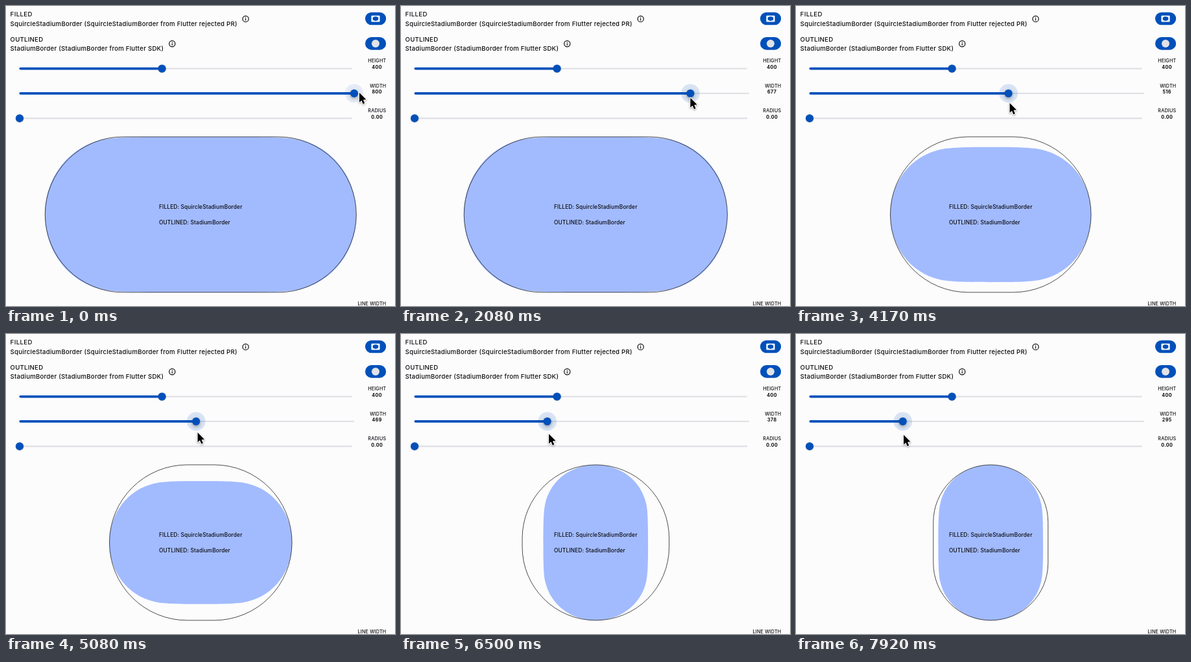
Animation of 600x463 px, one loop 8000 ms. Source, as an HTML page with a canvas:

```html
<!DOCTYPE html>
<html lang="en">
<head>
<meta charset="utf-8">
<title>Stadium border comparison</title>
<style>
html, body { margin: 0; width: 100%; height: 100%; overflow: hidden; background: #fcfcfd; }
canvas { display: block; width: 600px; height: 463px; }
</style>
</head>
<body>
<canvas id="stage"></canvas>
<script>
const W = 600, H = 463, LOOP = 8000, HOLD = 746, STEP = 250 / 3;
const BLUE = '#0050ba', INK = '#0c0c0f', PAPER = '#fcfcfd';
const SCALE = 0.6, CX = 300.3, CY = 321.9;
const canvas = document.getElementById('stage');
const ctx = canvas.getContext('2d');
const dpr = window.devicePixelRatio || 1;
canvas.width = W * dpr;
canvas.height = H * dpr;

// [step, value] pairs
const widthKeys = [[-1, 800], [16, 677], [27, 575], [39, 524.5], [41, 516], [49, 484],
  [59, 430], [62, 411], [77, 341], [79, 330], [86, 295]];
const pointerDx = [[-1, 8], [5, 1], [16, 0], [27, 1], [41, 2], [62, 2.6], [77, 2], [86, 1.3]];
const pointerY = [[-1, 133], [16, 141], [27, 146], [41, 149], [62, 153], [77, 154], [86, 155]];

// Monotone cubic interpolation through the keys
function sample(keys, x) {
  const slope = i => (keys[i + 1][1] - keys[i][1]) / (keys[i + 1][0] - keys[i][0]);
  const tangent = i => {
    if (i === 0) return slope(0);
    if (i === keys.length - 1) return slope(i - 1);
    const a = slope(i - 1), b = slope(i);
    return a * b > 0 ? 2 * a * b / (a + b) : 0;
  };
  let i = 0;
  while (i < keys.length - 2 && x > keys[i + 1][0]) i++;
  const [x0, y0] = keys[i], [x1, y1] = keys[i + 1];
  const h = x1 - x0, t = (x - x0) / h, u = 1 - t;
  return y0 * u * u * (1 + 2 * t) + y1 * t * t * (3 - 2 * t) +
    h * t * u * (u * tangent(i) - t * tangent(i + 1));
}

function text(str, x, y, size, spacing, { weight = 500, align = 'left' } = {}) {
  ctx.font = `${weight} ${size}px Inter, Roboto, sans-serif`;
  ctx.letterSpacing = spacing + 'px';
  ctx.textAlign = align;
  ctx.fillStyle = INK;
  ctx.fillText(str, x, y);
}

function disc(x, y, r, color) {
  ctx.beginPath();
  ctx.arc(x, y, r, 0, 2 * Math.PI);
  ctx.fillStyle = color;
  ctx.fill();
}

function pill(x, y, w, h, r, color) {
  ctx.beginPath();
  ctx.roundRect(x, y, w, h, r);
  ctx.fillStyle = color;
  ctx.fill();
}

function infoIcon(x, y) {
  ctx.beginPath();
  ctx.arc(x, y, 4.6, 0, 2 * Math.PI);
  ctx.lineWidth = 1.2;
  ctx.strokeStyle = INK;
  ctx.stroke();
  ctx.fillStyle = INK;
  ctx.fillRect(x - 0.6, y - 2.6, 1.2, 1.2);
  ctx.fillRect(x - 0.6, y - 0.6, 1.2, 3.2);
}

function slider(y, x, end, label, value, halo = 0) {
  pill(19.8, y - 1.2, end - 19.8, 2.4, 1.2, '#e2e2e6');
  pill(20.5, y - 1.8, x - 20.5, 3.6, 1.8, BLUE);
  if (halo) disc(x, y, 14.4, `rgba(0,80,186,${halo})`);
  ctx.save();
  ctx.shadowColor = 'rgba(0,0,0,0.35)';
  ctx.shadowBlur = (halo ? 5 : 1.2) * dpr;
  ctx.shadowOffsetY = (halo ? 2 : 0.3) * dpr;
  disc(x, y, 6.1, BLUE);
  ctx.restore();
  text(label, 586.3, y - 9.2, 7.2, 0.18, { align: 'right' });
  text(value, 572.2, y + 0.5, 7.2, 0.38, { weight: 700, align: 'center' });
}

// Squircle ends along the longer axis, with the shorter one clamped
function squircle(w, h) {
  const EDGE = 2.00594, SIDE = 1.3506, RATIO = EDGE / SIDE;
  const upright = w < h;
  const long = Math.max(w, h), short = Math.min(w, h, long / RATIO);
  const r = short / 2 / SIDE, a = long / 2, b = short / 2;
  const at = (sx, sy) => (u, v) => [sx * (a - u * r), sy * (b - v * r)];
  ctx.save();
  ctx.translate(CX, CY);
  if (upright) ctx.rotate(Math.PI / 2);
  ctx.beginPath();
  for (const sx of [1, -1]) {
    const first = at(sx, -sx), second = at(sx, sx);
    ctx.lineTo(...first(EDGE, 0));
    ctx.bezierCurveTo(...first(1.635, 0), ...first(1.2, 0), ...first(0.9954, 0.05));
    ctx.bezierCurveTo(...first(0.38, 0.19), ...first(0, 0.73), ...first(0, SIDE));
    ctx.bezierCurveTo(...second(0, 0.73), ...second(0.38, 0.19), ...second(0.9954, 0.05));
    ctx.bezierCurveTo(...second(1.2, 0), ...second(1.635, 0), ...second(EDGE, 0));
  }
  ctx.closePath();
  ctx.fillStyle = '#a2bbff';
  ctx.fill();
  ctx.restore();
}

function stadium(w, h) {
  ctx.beginPath();
  ctx.roundRect(CX - w / 2, CY - h / 2, w, h, Math.min(w, h) / 2);
  ctx.lineWidth = 0.7;
  ctx.strokeStyle = '#000';
  ctx.stroke();
}

function pointer(x, y) {
  const shape = [[0, 0], [0, 16.4], [3.7, 13], [6.2, 19], [9, 17.8], [6.5, 12], [11.4, 11.6]];
  ctx.save();
  ctx.translate(x, y);
  ctx.scale(0.92, 0.92);
  ctx.beginPath();
  shape.forEach(p => ctx.lineTo(...p));
  ctx.closePath();
  ctx.lineJoin = 'round';
  ctx.lineWidth = 2.4;
  ctx.strokeStyle = '#fff';
  ctx.shadowColor = 'rgba(0,0,0,0.35)';
  ctx.shadowBlur = 2.5 * dpr;
  ctx.shadowOffsetY = dpr;
  ctx.stroke();
  ctx.shadowColor = 'transparent';
  ctx.fillStyle = '#000';
  ctx.fill();
  ctx.restore();
}

function header() {
  text('FILLED', 6.6, 16.4, 9.6, 0.4);
  text('SquircleStadiumBorder (SquircleStadiumBorder from Flutter rejected PR)', 6.6, 30.6, 9.6, 0.25);
  infoIcon(369.6, 19.9);
  text('OUTLINED', 6.6, 54.6, 9.6, 0.25);
  text('StadiumBorder (StadiumBorder from Flutter SDK)', 6.6, 68.9, 9.6, 0.25);
  infoIcon(256.3, 58.2);

  pill(554, 9.7, 32.2, 19.6, 9.8, BLUE);
  pill(563.4, 14.7, 13.2, 9.8, 1.2, '#fff');
  ctx.beginPath();
  ctx.ellipse(570, 19.6, 4.4, 3.3, 0, 0, 2 * Math.PI);
  ctx.fillStyle = BLUE;
  ctx.fill();
  pill(554, 48.1, 32.2, 19.6, 9.8, BLUE);
  disc(570, 58, 6, '#e2e2e6');
}

function draw(time) {
  const step = Math.min(86, Math.max(-1, Math.floor((time - HOLD) / STEP)));
  const width = sample(widthKeys, step);
  const thumb = 21 + (width - 100) / 700 * 516;

  ctx.setTransform(dpr, 0, 0, dpr, 0, 0);
  ctx.fillStyle = PAPER;
  ctx.fillRect(0, 0, W, H);
  header();
  slider(96.6, 240.6, 534, 'HEIGHT', '400');
  slider(134.9, thumb, 537.2, 'WIDTH', String(Math.round(width)), step < 0 ? 0.09 : 0.14);
  slider(173.3, 21, 534, 'RADIUS', '0.00');
  squircle(width * SCALE, 400 * SCALE);
  stadium(width * SCALE, 400 * SCALE);
  text('FILLED: SquircleStadiumBorder', 236, 313.2, 8.4, 0.12);
  text('OUTLINED: StadiumBorder', 236, 337.3, 8.4, 0.12);
  text('LINE WIDTH', 586.3, 462, 7.2, 0.18, { align: 'right' });
  pointer(thumb + sample(pointerDx, step), sample(pointerY, step) + 0.7);
}

const start = performance.now();
function tick() {
  draw((performance.now() - start) % LOOP);
  requestAnimationFrame(tick);
}
tick();
</script>
</body>
</html>
```
